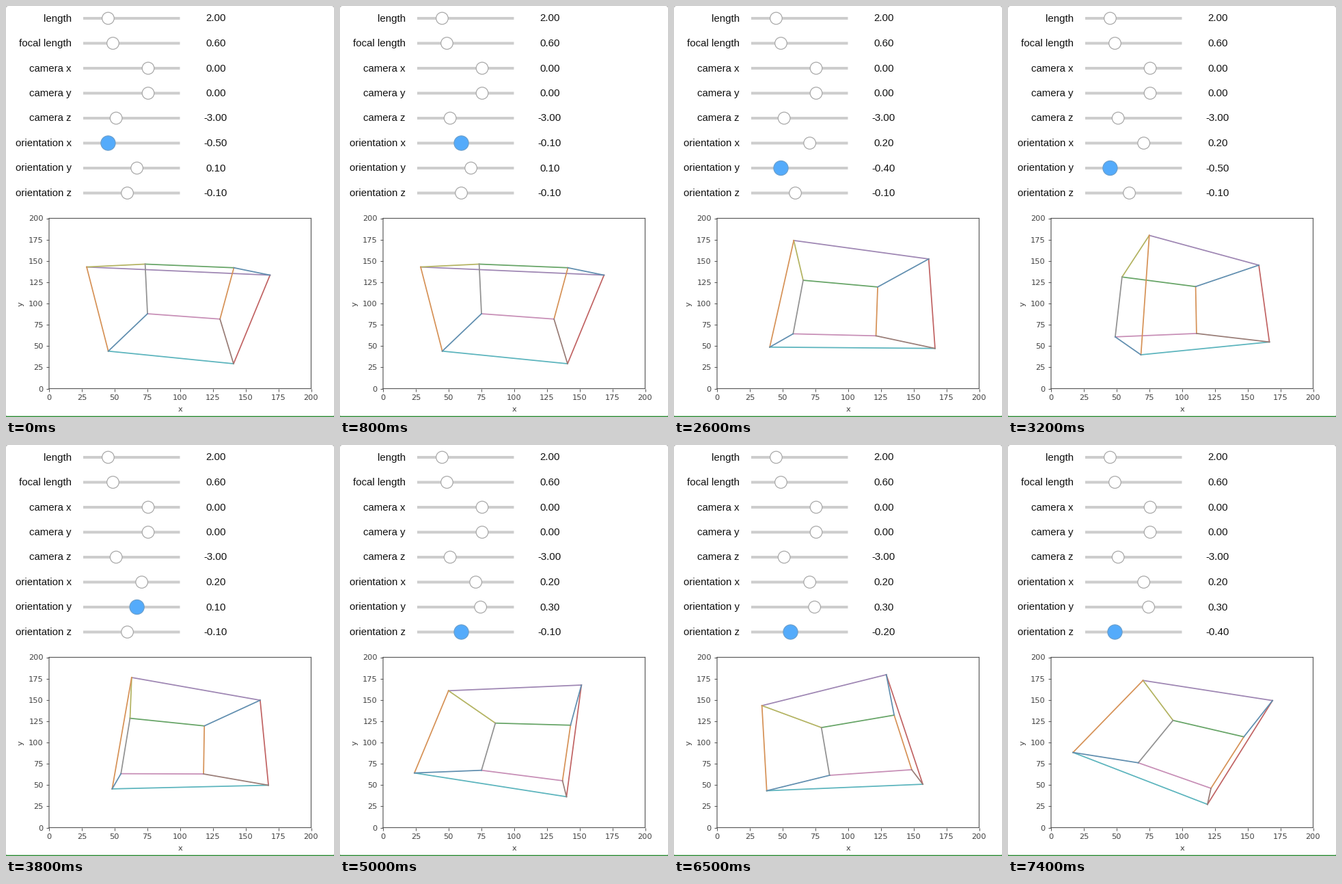
Recreate the animation shown at these times as a matplotlib script. Size 480x601 px, loop 7500 ms.

```python
import numpy as np
import matplotlib.pyplot as plt
from matplotlib.animation import FuncAnimation
from matplotlib.colors import to_rgb
from matplotlib.patches import Circle, FancyBboxPatch, Rectangle

W, H, DPI = 480, 601, 72
FRAMES, INTERVAL = 75, 100
LAG = 4  # the plot trails the sliders by this many frames

# label: value, low, high
FIXED = {"length": (2, 1, 5), "focal length": (0.6, 0, 2),
         "camera x": (0, -4, 2), "camera y": (0, -4, 2),
         "camera z": (-3, -5, 1)}

# Drags: key frames and angles, linear between
DRAGS = {"x": ([-4, 0, 3, 11], [-.4, -.5, -.5, .2]),
         "y": ([17, 27, 32, 40], [.1, -.5, -.5, .3]),
         "z": ([51, 55, 60, 65, 69], [-.1, .3, .3, -.2, -.4])}


def angle(axis, i):
    """Slider value, snapped to steps of 0.1."""
    return np.round(10 * np.interp(i, *DRAGS[axis])) / 10 + 0.0


def active(i):
    return "x" if i < 17 else "y" if i < 46 else "z"


# Near face, then far face, each clockwise from top left
CUBE = np.array([(x, y, z) for z in (-1, 1)
                 for x, y in ((-1, 1), (1, 1), (1, -1), (-1, -1))], float)
EDGES = []
for k, (near, far, link) in enumerate(zip("4391", "2167", "8050")):
    n = (k + 1) % 4
    EDGES += [(k, n, "C" + near), (k + 4, n + 4, "C" + far),
              (k, k + 4, "C" + link)]


def project(ox, oy, oz):
    c, s = np.cos, np.sin
    rx = np.array([[1, 0, 0], [0, c(ox), -s(ox)], [0, s(ox), c(ox)]])
    ry = np.array([[c(oy), 0, s(oy)], [0, 1, 0], [-s(oy), 0, c(oy)]])
    rz = np.array([[c(oz), -s(oz), 0], [s(oz), c(oz), 0], [0, 0, 1]])
    p = CUBE @ (rz @ ry @ rx).T + (0, 0, 3)
    return 100 + 200 * 0.6 * p[:, :2] / p[:, 2:]


def soften(color):
    return 0.53 * np.array(to_rgb(color)) + 0.47 * 0.66


fig = plt.figure(figsize=(W / DPI, H / DPI), dpi=DPI, facecolor="#b4b4b4")
page = fig.add_axes([0, 0, 1, 1])
page.set(xlim=(0, W), ylim=(H, 0))
page.axis("off")
page.add_patch(FancyBboxPatch((0, 0), W, H, fc="white", ec="none",
                              boxstyle="round,pad=0,rounding_size=4"))
page.add_patch(Rectangle((0, H - 1.4), W, 1.4, fc="#2c8a34", ec="none",
                         snap=False, zorder=4))

# Slider panel
LABEL = dict(family="Liberation Sans", size=15, color="#111111", va="baseline")


def knob_x(val, low, high):
    return 114.3 + 140.6 * (val - low) / (high - low)


def add_row(row, label, val, low, high):
    y = 18 + 36.5 * row
    page.plot([113, 254.5], [y, y], color="#cdcdcd", lw=4, snap=False,
              solid_capstyle="butt", zorder=2)
    page.text(96, y + 4.5, label, ha="right", **LABEL)
    text = page.text(307, y + 4.5, f"{val:.2f}", ha="center", **LABEL)
    knob = page.add_patch(Circle((knob_x(val, low, high), y), 8.8, fc="white",
                                 ec="#a6a6a6", lw=1.2, zorder=3))
    return knob, text


for row, (label, spec) in enumerate(FIXED.items()):
    add_row(row, label, *spec)
sliders = {a: add_row(5 + k, "orientation " + a, 0, -1, 1)
           for k, a in enumerate("xyz")}

# Plot
L, R, T, B = 63, 446.5, 310.5, 559.5
INK = "#404040"
ax = fig.add_axes([L / W, 1 - B / H, (R - L) / W, (B - T) / H])
ticks = range(0, 201, 25)
ax.set(xlim=(0, 200), ylim=(0, 200), xticks=ticks, yticks=ticks)
ax.tick_params(length=4, width=0.9, pad=4, labelsize=11.4, color=INK,
               labelcolor=INK, labelfontfamily="DejaVu Sans")
for spine in ax.spines.values():
    spine.set(linewidth=1.2, color="#5c5c5c", snap=False)
name = dict(family="DejaVu Sans", size=11.4, color=INK, ha="center", va="center")
page.text(255, 590, "x", **name)
page.text(21.5, 436, "y", rotation=90, **name)
lines = [ax.plot([], [], color=soften(c), lw=1.75)[0] for *_, c in EDGES]


def update(i):
    for axis, (knob, text) in sliders.items():
        v = angle(axis, i)
        on = axis == active(i)
        knob.center = (knob_x(v, -1, 1), knob.center[1])
        knob.set(radius=10.6 if on else 8.8, fc="#54abfb" if on else "white",
                 ec="#6a9fcd" if on else "#a6a6a6")
        text.set_text(f"{v:.2f}")
    pts = project(*(angle(a, i - LAG) for a in "xyz"))
    for line, (a, b, _) in zip(lines, EDGES):
        line.set_data(pts[[a, b], 0], pts[[a, b], 1])
    return lines


anim = FuncAnimation(fig, update, frames=FRAMES, interval=INTERVAL,
                     repeat=True, repeat_delay=0, blit=False)
plt.show()
```
